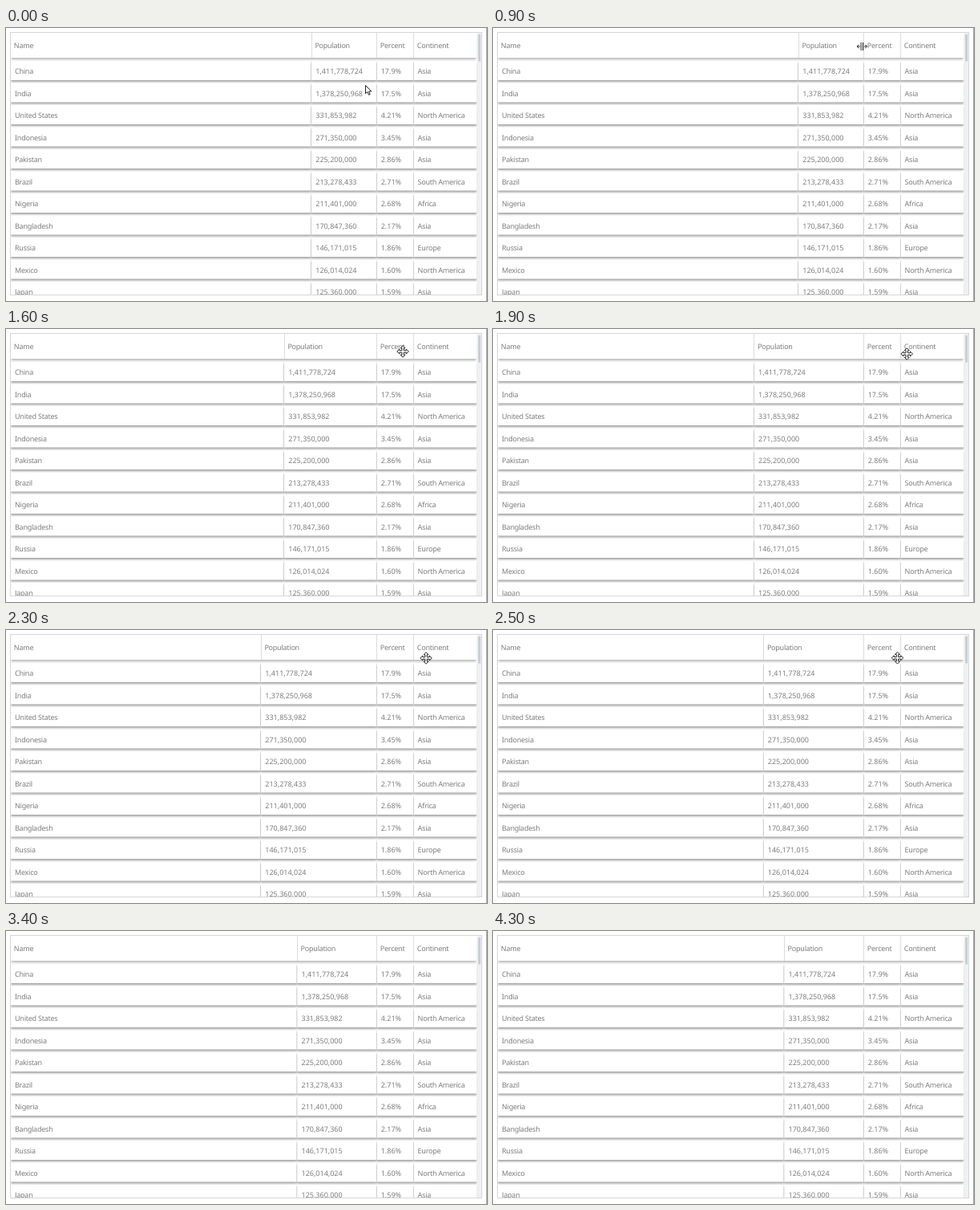
These frames come from a looping animation (600 by 340 pixels, 4.4 s). An HTML page with a canvas:

```html
<!DOCTYPE html>
<html lang="en">
<head>
<meta charset="utf-8">
<title>Column resize</title>
<style>
html, body { margin: 0; width: 600px; height: 340px; overflow: hidden; background: #fff; }
canvas { display: block; }
</style>
</head>
<body>
<canvas id="stage" width="600" height="340"></canvas>
<script>
const ctx = document.getElementById('stage').getContext('2d');
const LOOP = 4400, STEP = 100, PITCH = 27.5;
const header = ['Name', 'Population', 'Percent', 'Continent'];
const rows = [
  ['China', '1,411,778,724', '17.9%', 'Asia'],
  ['India', '1,378,250,968', '17.5%', 'Asia'],
  ['United States', '331,853,982', '4.21%', 'North America'],
  ['Indonesia', '271,350,000', '3.45%', 'Asia'],
  ['Pakistan', '225,200,000', '2.86%', 'Asia'],
  ['Brazil', '213,278,433', '2.71%', 'South America'],
  ['Nigeria', '211,401,000', '2.68%', 'Africa'],
  ['Bangladesh', '170,847,360', '2.17%', 'Asia'],
  ['Russia', '146,171,015', '1.86%', 'Europe'],
  ['Mexico', '126,014,024', '1.60%', 'North America'],
  ['Japan', '125,360,000', '1.59%', 'Asia']
];

// [time, value] points
const divider = [[1100, 381], [1200, 377], [1400, 363], [1600, 347], [1800, 334.5], [2000, 317],
  [2100, 312.7], [2200, 313], [2300, 318], [2400, 327], [2600, 348], [2700, 356], [2800, 360.5], [3000, 363.2]];
const pointerX = [[0, 448.5], [300, 450], [600, 460], [1100, 460.5]];
const pointerY = [[0, 71.5], [200, 60], [600, 24], [900, 23], [1200, 23], [1600, 28], [2300, 35], [2800, 34.5], [2900, 36]];
const exitX = [[2900, 479], [3000, 480], [3400, 610]];
const exitY = [[2900, 36], [3000, 37], [3400, 345]];

function at(points, t) {
  const i = points.findIndex(p => p[0] >= t);
  if (i < 0) return points[points.length - 1][1];
  if (i === 0) return points[0][1];
  const [t0, a] = points[i - 1], [t1, b] = points[i];
  return a + (b - a) * (t - t0) / (t1 - t0);
}

function bar(x, y, w, h, color) {
  ctx.fillStyle = color;
  ctx.fillRect(x, y, w, h);
}

function texts(items, lefts, y) {
  ctx.fillStyle = '#7d7d7d';
  items.forEach((s, i) => {
    ctx.letterSpacing = /\d/.test(s) ? '0px' : '-0.24px';
    ctx.fillText(s, lefts[i], y);
  });
}

// White cells sharing one soft shadow below
function cells(edges, y, h) {
  ctx.save();
  ctx.shadowColor = 'rgba(0,0,0,.42)';
  ctx.shadowBlur = 3;
  ctx.shadowOffsetY = 1.8;
  ctx.fillStyle = '#fff';
  ctx.beginPath();
  for (let i = 0; i + 1 < edges.length; i++) ctx.rect(edges[i], y, edges[i + 1] - edges[i] - .6, h);
  ctx.fill();
  ctx.restore();
}

function table(x) {
  const edges = [6, x, 462.5, 508.5, 588];
  ctx.save();
  ctx.beginPath();
  ctx.rect(5, 5, 589, 327);
  ctx.clip();
  rows.forEach((row, i) => {
    const y = 41 + i * PITCH;
    cells(edges, y, 24);
    texts(row, [11, x + 5.3, 467.7, 513.6], y + 16.3);
  });
  cells([6, 588], 6, 31.2);
  edges.slice(1, 4).forEach(e => bar(Math.round(e - .5), 6, 1, 31, '#dcdcdc'));
  texts(header, [9.8, x + 4.4, 466.8, 512.8], 24.8);
  bar(587.5, 6, 6.5, 326, '#eef0f1');
  bar(589, 8, 3, 33.5, '#c9ced3');
  ctx.restore();
  ctx.strokeStyle = '#d6d6d6';
  ctx.lineWidth = 1;
  ctx.strokeRect(5.5, 5.5, 588, 327);
  bar(599, 0, 1, 340, '#a0a0a0');
}

const arrow = new Path2D('M0 0V10.2L2.4 8L4 11.8L5.7 11L4.1 7.4H7.3Z');
const resize = new Path2D('M-1.2-5V5M1.2-5V5M-2.5 0H-6M2.5 0H6M-4-2.2L-6.2 0L-4 2.2M4-2.2L6.2 0L4 2.2');
const move = new Path2D('M0-7.3L3-4.2H1.2V-1.2H4.2V-3L7.3 0L4.2 3V1.2H1.2V4.2H3L0 7.3L-3 4.2H-1.2V1.2H-4.2V3L-7.3 0L-4.2-3V-1.2H-1.2V-4.2H-3Z');

function cursor(shape, x, y) {
  ctx.save();
  ctx.translate(x, y);
  ctx.strokeStyle = '#222';
  ctx.lineWidth = 1;
  ctx.fillStyle = '#fff';
  if (shape !== resize) ctx.fill(shape);
  ctx.stroke(shape);
  ctx.restore();
}

function draw(now) {
  const t = Math.floor(now % LOOP / STEP) * STEP;
  const x = at(divider, t);
  ctx.clearRect(0, 0, 600, 340);
  ctx.font = '9px "Noto Sans", "Open Sans", sans-serif';
  ctx.textRendering = 'geometricPrecision';
  table(x);
  if (t < 600) cursor(arrow, at(pointerX, t), at(pointerY, t));
  else if (t < 1100) cursor(resize, at(pointerX, t), at(pointerY, t));
  else if (t < 2900) cursor(move, 842 - x, at(pointerY, t));
  else if (t < 3400) cursor(arrow, at(exitX, t), at(exitY, t));
  requestAnimationFrame(() => draw(performance.now()));
}
draw(0);
</script>
</body>
</html>
```
